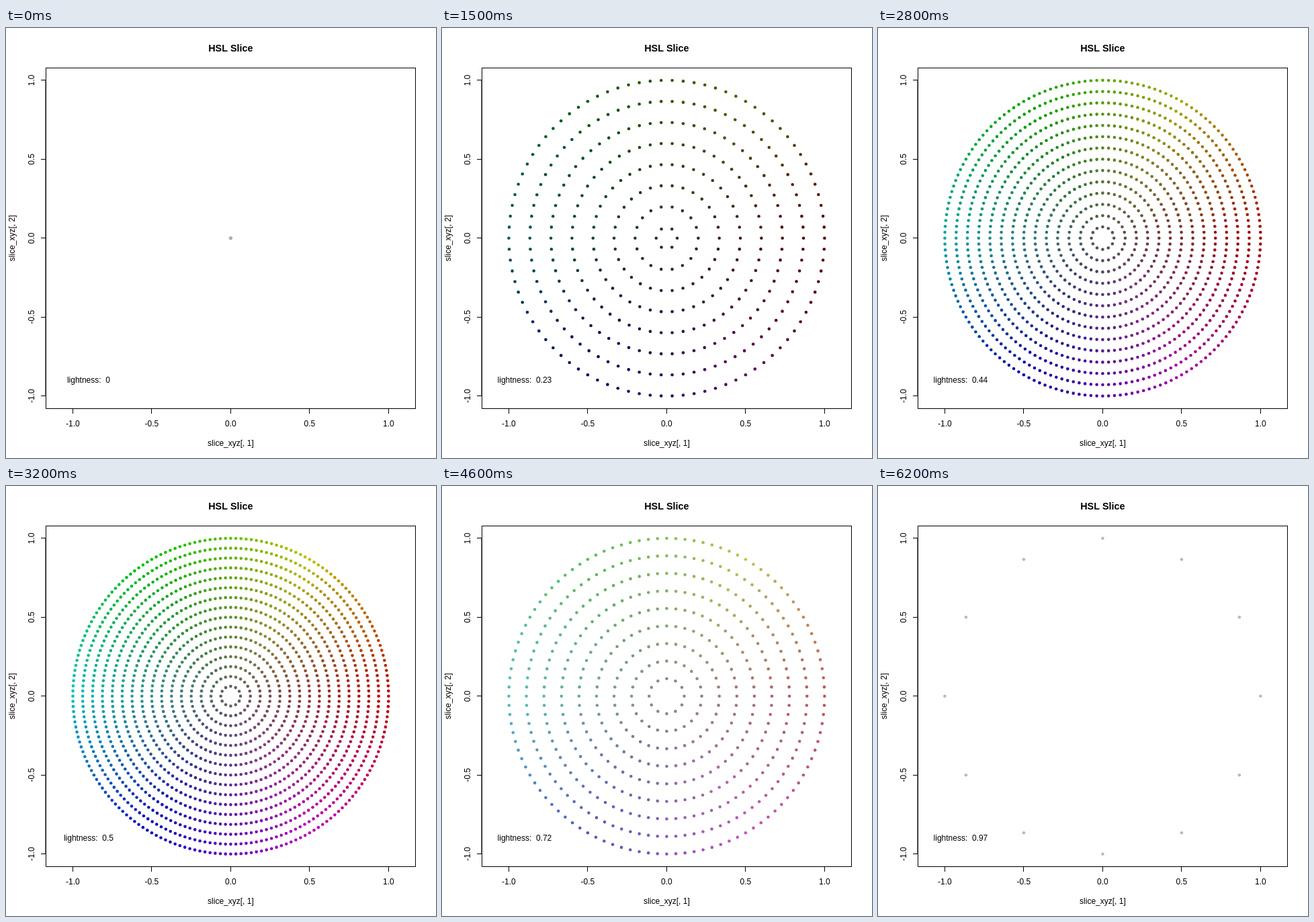
These frames come from a looping animation (640 by 640 pixels, 6300 ms). An HTML page with a canvas:

```html
<!DOCTYPE html>
<html lang="en">
<head>
<meta charset="utf-8">
<title>HSL Slice</title>
<style>
  html, body { margin: 0; width: 100%; height: 100%; overflow: hidden; background: #fff; }
  canvas { display: block; width: 640px; height: 640px; }
</style>
</head>
<body>
<canvas id="plot" width="640" height="640"></canvas>
<script>
const ctx = document.getElementById('plot').getContext('2d');
const FONT = '"Liberation Sans", Arial, sans-serif';
const STEP_MS = 100, STEPS = 63, LEVELS = 64;
const CX = 334.4, CY = 312.8, UNIT = 234.96;
const BOX = { left: 59.5, top: 59.5, right: 609.5, bottom: 566.5 };
const TICKS = [-1, -0.5, 0, 0.5, 1];
const DOT = 2.3, SHADE = 0.75;

const px = x => CX + x * UNIT;
const py = y => CY - y * UNIT;
const crisp = v => Math.floor(v) + 0.5;

function line(x1, y1, x2, y2) {
  ctx.beginPath();
  ctx.moveTo(x1, y1);
  ctx.lineTo(x2, y2);
  ctx.stroke();
}

function label(text, x, y, { font = '12px', turned = false } = {}) {
  ctx.save();
  ctx.translate(x, y);
  if (turned) ctx.rotate(-Math.PI / 2);
  ctx.font = `${font} ${FONT}`;
  ctx.textAlign = 'center';
  ctx.fillStyle = '#000';
  ctx.fillText(text, 0, 0);
  ctx.restore();
}

function disc(x, y, color) {
  ctx.fillStyle = color;
  ctx.beginPath();
  ctx.arc(x, y, DOT, 0, 2 * Math.PI);
  ctx.fill();
}

function shadedHsl(hue, sat, light) {
  let chroma = sat * Math.min(light, 1 - light);
  if (chroma < 0.04) chroma = 0; // nearly neutral colours read as grey
  const channel = n => {
    const k = (n + hue / 30) % 12;
    const value = light - chroma * Math.max(-1, Math.min(k - 3, 9 - k, 1));
    return Math.round(255 * SHADE * value);
  };
  return `rgb(${channel(0)},${channel(8)},${channel(4)})`;
}

// Two decimals, ties going to the even digit
function twoDecimals(value) {
  const scaled = value * 100;
  let rounded = Math.round(scaled);
  if (scaled % 1 === 0.5 && rounded % 2) rounded--;
  return String(rounded / 100);
}

function drawAxes() {
  const { left, top, right, bottom } = BOX;
  ctx.strokeStyle = '#000';
  ctx.lineWidth = 1;
  ctx.strokeRect(left, top, right - left, bottom - top);
  line(59.04, py(1), 59.04, py(-1));
  line(px(-1), 566.56, px(1), 566.56);
  for (const t of TICKS) {
    const x = crisp(px(t)), y = crisp(py(t));
    line(x, bottom, x, 574);
    line(left, y, 52, y);
    label(t.toFixed(1), px(t), 593);
    label(t.toFixed(1), 42, py(t), { turned: true });
  }
  label('HSL Slice', CX, 35, { font: 'bold 14.4px' });
  label('slice_xyz[, 1]', CX, 622);
  label('slice_xyz[, 2]', 13, CY, { turned: true });
}

// Rings of 6k dots, spread so the widest ring always has radius 1
function drawSlice(level) {
  const light = level / LEVELS;
  const widest = Math.min(level, LEVELS - level);
  if (widest === 0) {
    disc(CX, CY, '#b4b4b4');
    ctx.strokeStyle = '#858585';
    ctx.lineWidth = 0.6;
    ctx.stroke();
  }
  for (let k = widest; k > 0; k -= 2) {
    const radius = k / widest, count = 6 * k;
    for (let j = 0; j < count; j++) {
      const angle = 2 * Math.PI * j / count;
      disc(px(radius * Math.cos(angle)), py(radius * Math.sin(angle)),
        shadedHsl(360 * j / count, radius, light));
    }
  }
  label('lightness:  ' + twoDecimals(light), px(-0.9), 528);
}

let shown = -1;
const start = performance.now();

function tick() {
  const elapsed = Math.max(0, performance.now() - start);
  const level = Math.floor(elapsed / STEP_MS) % STEPS;
  if (level !== shown) {
    shown = level;
    ctx.fillStyle = '#fff';
    ctx.fillRect(0, 0, 640, 640);
    drawAxes();
    drawSlice(level);
  }
  requestAnimationFrame(tick);
}
tick();
</script>
</body>
</html>
```
